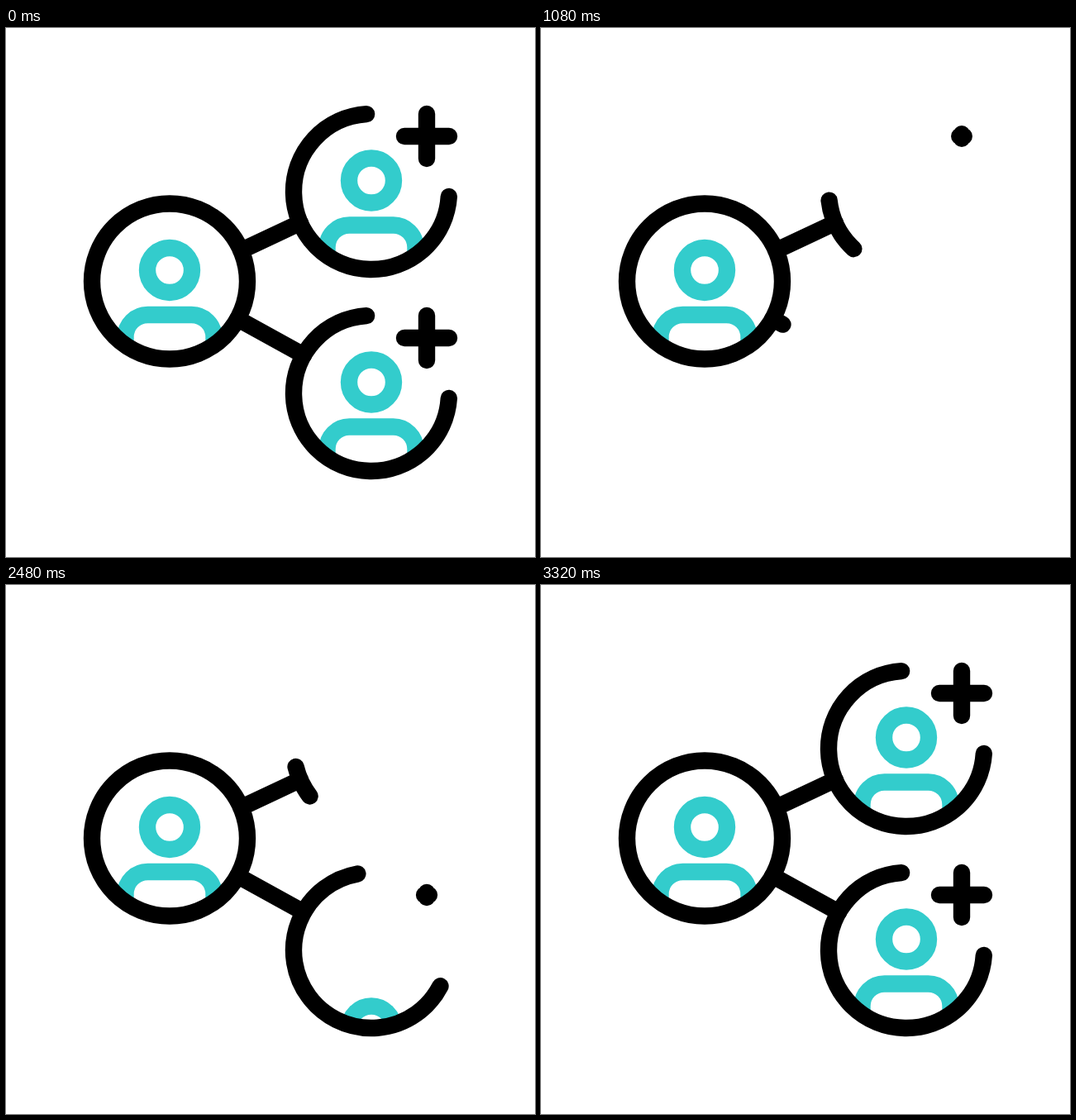
Animation of 640 by 640 pixels, one loop 3600 ms. Source, as an HTML page:

```html
<!DOCTYPE html>
<html lang="en">
<head>
<meta charset="utf-8">
<title>Sharing network</title>
<style>
  html, body { margin: 0; width: 100%; height: 100%; overflow: hidden; background: #fff; }
  svg { display: block; width: 100vw; height: 100vh; }
  .ink, .person { fill: none; stroke-width: 20.4; stroke-linecap: round; stroke-linejoin: round; }
  .ink { stroke: #000; }
  .person { stroke: #3cc; }
</style>
</head>
<body>
<svg viewBox="0 0 640 640">
  <defs>
    <clipPath id="disc"><circle r="94"/></clipPath>
    <path id="torso" d="M-53.5 160V67.5a27 27 0 0 1 27-27h53a27 27 0 0 1 27 27V160"/>
  </defs>
  <g id="scene"></g>
</svg>
<script>
const LOOP = 3600;
const R = 94;                              // ring radius
const GAP_START = 266.4, GAP_END = 3.6;    // ring ends, in degrees
const LINK_MS = 243, RING_MS = 424;
const HUB = { x: 198, y: 306.5 };

// join and root: angles where the link meets the node's ring and the hub.
// popOut and popIn move person and plus, lineOut and lineIn the strokes.
const nodes = [
  { x: 442, y: 198, join: 156.4, root: -23.3, popOut: 600, lineOut: 723, lineIn: 2199, popIn: 2602 },
  { x: 442, y: 442, join: 209.4, root: 28.9, popOut: 30, lineOut: 451, lineIn: 1863, popIn: 2374 }
];

const scene = document.getElementById('scene');

function add(parent, tag, attrs) {
  const el = document.createElementNS('http://www.w3.org/2000/svg', tag);
  for (const k in attrs) el.setAttribute(k, attrs[k]);
  return parent.appendChild(el);
}

const addStroke = () => add(scene, 'path', { class: 'ink' });

function addPerson({ x, y }) {
  const clip = add(scene, 'g', { transform: `translate(${x} ${y})`, 'clip-path': 'url(#disc)' });
  const body = add(clip, 'g', { class: 'person' });
  const head = add(body, 'circle', { cy: -13.5, r: 27 });
  add(body, 'use', { href: '#torso' });
  return { body, head };
}

function setPath(el, d, visible) {
  el.setAttribute('d', d);
  el.setAttribute('visibility', visible ? 'visible' : 'hidden');
}

// 0 before start, 1 after start + ms, linear between.
const ramp = (t, start, ms) => Math.min(1, Math.max(0, (t - start) / ms));

// 1 at rest, falls to 0 from `out` on and returns to 1 from `back` on.
const away = (t, out, outMs, back, backMs) =>
  t < back ? 1 - ramp(t, out, outMs) : ramp(t, back, backMs);

// Rises past 1 to `peak` at u = `at`, then settles on 1.
const overshoot = (u, at, peak) =>
  u < at ? peak * u / at : 1 + (peak - 1) * (1 - u) / (1 - at);

const mix = (a, b, u) => a + (b - a) * u;

function onRing(c, deg) {
  const a = deg * Math.PI / 180;
  return [c.x + R * Math.cos(a), c.y + R * Math.sin(a)];
}

function drawNode(n, t) {
  const link = away(t, n.lineOut + RING_MS, LINK_MS, n.lineIn, LINK_MS);
  const [x0, y0] = onRing(HUB, n.root), [x1, y1] = onRing(n, n.join);
  setPath(n.linkEl, `M${x0} ${y0}L${mix(x0, x1, link)} ${mix(y0, y1, link)}`, link > 0);

  const ring = away(t, n.lineOut, RING_MS, n.lineIn + LINK_MS, RING_MS);
  const start = mix(n.join, GAP_START, ring), end = mix(n.join, GAP_END, ring);
  const large = start - end > 180 ? 1 : 0;
  setPath(n.ringEl, `M${onRing(n, start)}A${R} ${R} 0 ${large} 0 ${onRing(n, end)}`, ring > 0);

  const plus = overshoot(away(t, n.popOut, 510, n.popIn + 68, 643), 0.757, 1.36);
  const arm = 27 * plus, cx = n.x + 67, cy = n.y - 67;
  setPath(n.plusEl, `M${cx - arm} ${cy}H${cx + arm}M${cx} ${cy - arm}V${cy + arm}`, plus > 0);

  const rise = overshoot(away(t, n.popOut, 420, n.popIn, 710), 0.624, 1.16);
  n.person.body.setAttribute('transform', `translate(0 ${150 * (1 - rise)})`);
}

function draw(t) {
  for (const n of nodes) drawNode(n, t);
  const hop = Math.sin(Math.PI * ramp(t, 1500, 600)) ** 2;
  hub.head.setAttribute('cy', -13.5 - 20 * hop);
}

const hub = addPerson(HUB);
for (const n of nodes) {
  n.person = addPerson(n);
  n.linkEl = addStroke();
  n.ringEl = addStroke();
  n.plusEl = addStroke();
}
add(scene, 'circle', { class: 'ink', cx: HUB.x, cy: HUB.y, r: R });

const begin = performance.now();
function frame() {
  draw((performance.now() - begin) % LOOP);
  requestAnimationFrame(frame);
}
draw(0);
requestAnimationFrame(frame);
</script>
</body>
</html>
```
